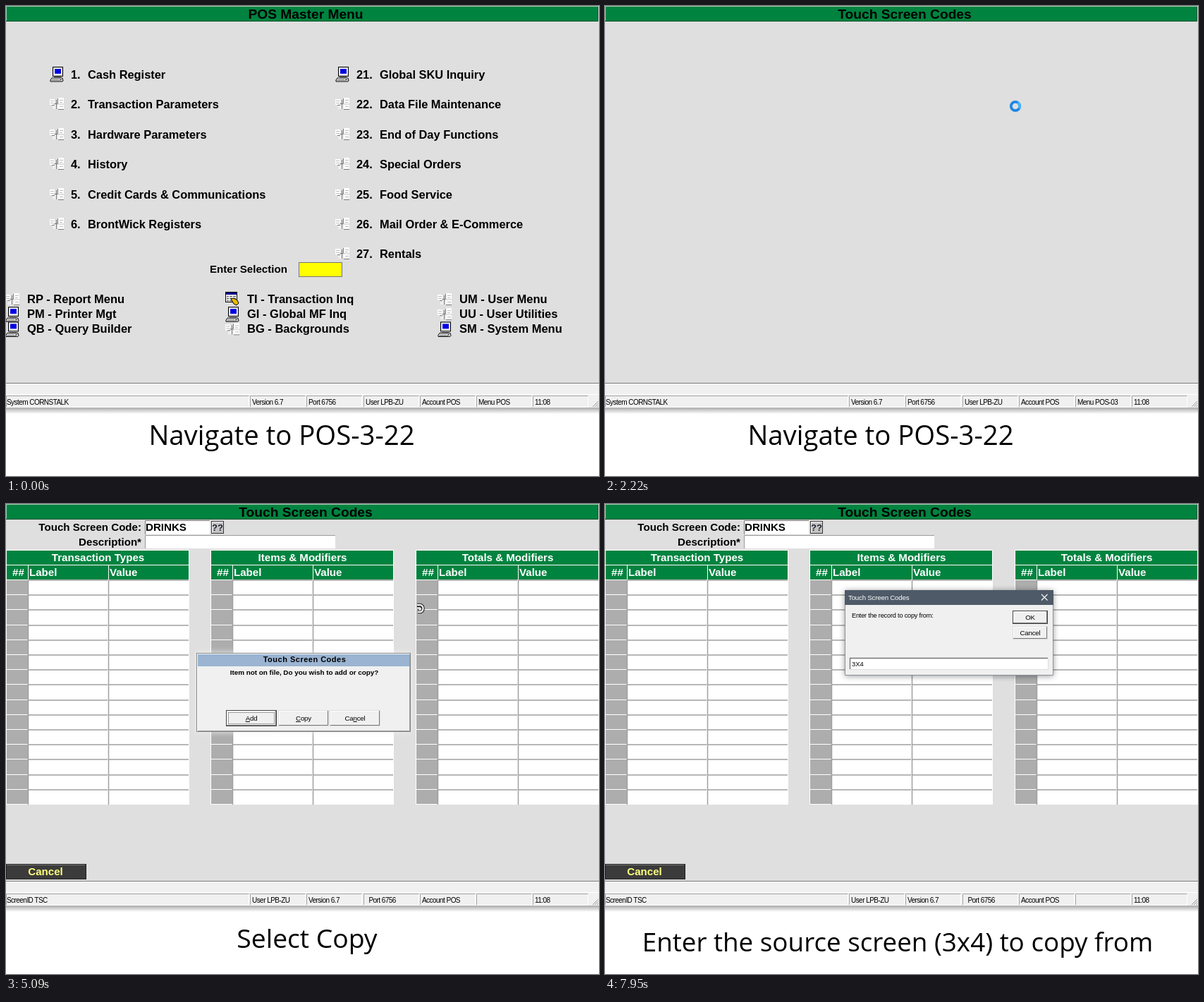
Recreate the animation shown at these times as an HTML page. Size 841 by 666 pixels, loop 8000 ms.

```html
<!DOCTYPE html>
<html lang="en">
<head>
<meta charset="utf-8">
<title>Touch screen codes</title>
<style>
html, body { margin: 0; width: 100%; height: 100%; overflow: hidden; background: #fff; }
svg { display: block; width: 841px; height: 666px; }
text { font-family: "Liberation Sans", Arial, sans-serif; white-space: pre; }
.b { font-weight: bold; }
.cap { font-family: "Open Sans", "Noto Sans", sans-serif; }
.s { letter-spacing: -.55px; }
.t { letter-spacing: -.2px; }
.wide { font-weight: bold; letter-spacing: .5px; }
.u { text-decoration: underline; }
</style>
</head>
<body>
<svg id="stage" viewBox="0 0 841 666"></svg>
<script>
const GREEN = '#00833f', FACE = '#f0f0f0';

const rect = (x, y, w, h, fill, more = '') =>
  `<rect x="${x}" y="${y}" width="${w}" height="${h}" fill="${fill}" ${more}/>`;
const text = (x, y, size, s, cls = 'b', fill = '#000', anchor = 'start') =>
  `<text x="${x}" y="${y}" font-size="${size}" class="${cls}" fill="${fill}" text-anchor="${anchor}">${s}</text>`;
const mid = (x, y, size, s, cls, fill) => text(x, y, size, s, cls, fill, 'middle');
const line = (d, color, w = 1) => `<path d="${d}" fill="none" stroke="${color}" stroke-width="${w}"/>`;
const group = (id, ...parts) => `<g id="${id}">${parts.join('')}</g>`;
const at = (x, y, s) => `<g transform="translate(${x} ${y})">${s}</g>`;

// Menu icons, 20 pixels wide
const PC = rect(4.5, .5, 14, 13, '#d8d8d8', 'stroke="#000"') + rect(6, 2, 11, 9, '#fff') +
  rect(7, 3, 9, 7, '#0000e0') + rect(6, 14, 10, 2, '#888') +
  '<path d="M3 16h15l1 4-1 1H1v-2z" fill="#eee" stroke="#000"/>' +
  line('M3 18.5h10M2 20h13', '#777') + line('M14 18.5h3', '#000');
const PAGES = rect(0, 4, 7, 8, '#fff') + rect(12, 2, 8, 8, '#fff') + rect(12, 12, 8, 7, '#fff') +
  rect(4, 12, 7, 6, '#eee') + line('M1 6.5h5M1 9.5h5M14 5.5h5M14 8.5h4M14 14.5h5', '#bbb') +
  line('M6.5 10.5h5M9.5 5v13M11.5 3v7M12 18.5h8M3 12.5h4', '#777');
const TABLE = rect(.5, .5, 16, 14, '#fff', 'stroke="#000"') + rect(1, 1, 15, 3, '#000090') +
  line('M2 6.5h13M2 9.5h13M2 12.5h9', '#666', 1.4) + line('M5.5 4v10M10.5 4v10', '#fff') +
  '<path d="M8 10l4-1 5 3 2 4-3 3-4-2z" fill="#e8b800" stroke="#000"/>';

const title = s => mid(425, 18, 19.2, s);

function menu(x, gap, first, items, icons) {
  return items.map((s, i) => {
    const y = Math.round(97 + 42.4 * i);
    return at(x, y - 11, icons(i) ? PC : PAGES) +
      text(x + 30, y + 5.5, 16.4, first + i + '.') + text(x + gap, y + 5.5, 16.4, s);
  }).join('');
}

const foot = [
  [-1, 30, [['RP - Report Menu', PAGES], ['PM - Printer Mgt', PC], ['QB - Query Builder', PC]]],
  [311, 342, [['TI - Transaction Inq', TABLE], ['GI - Global MF Inq', PC], ['BG - Backgrounds', PAGES]]],
  [612, 643, [['UM - User Menu', PAGES], ['UU - User Utilities', PAGES], ['SM - System Menu', PC]]]
].map(([ix, x, rows]) => rows.map(([s, icon], i) =>
  at(ix, 405 + 21.2 * i, icon) + text(x, 421 + 21.2 * i, 16.5, s)).join('')).join('');

const button = (w, y, x, s) => rect(.5, y + .5, w - 1, 21, '#3b3b3b', 'stroke="#222"') +
  line(`M1 ${y + 1.5}H${w - 2}`, '#777') + mid(x, y + 16, 15.1, s, 'b', '#ffff80');

const panels = [0, 346, 426, 507, 587, 667, 747];
const status = (id, list) => group(id, ...list.map((s, i) => text(panels[i] + (i ? 3 : 1), 564.5, 10, s, 's')));
const statusBar = panels.map((x, i) => {
  const r = i ? x + 78.5 : 344.5;
  return line(`M${x + .5} 568V552.5H${r}`, '#a5a5a5') + line(`M${x} 568.5H${r}V553`, '#fff');
}).join('') + line('M832 568l8-8M835 568l5-5M838 568l2-2', '#999');

function grid(x, name) {
  let s = rect(x, 65, 260, 361, '#fff') + rect(x + 1, 66, 258, 20, GREEN) + rect(x + 1, 87, 258, 20, GREEN) +
    rect(x + 31, 87, 1, 20, '#fff') + rect(x + 145, 87, 1, 20, '#fff') +
    mid(x + 130.5, 80.5, 15.1, name, 'b', '#fff') + text(x + 9, 102, 15.1, '##', 'b', '#fff') +
    text(x + 33, 102, 15.1, 'Label', 'b', '#fff') + text(x + 147, 102, 15.1, 'Value', 'b', '#fff');
  for (let i = 0; i < 15; i++) {
    const y = Math.round(108 + 21.2 * i), h = Math.round(129.2 + 21.2 * i) - y;
    s += rect(x + 1, y, 30, h - 1, '#adadad') +
      line(`M${x + 31.5} ${y + h}V${y}H${x + 144}M${x + 145.5} ${y + h}V${y}H${x + 259}`, '#a0a0a0', 1.5);
  }
  return s;
}

const page = grid(0, 'Transaction Types') + grid(290, 'Items &amp; Modifiers') + grid(581, 'Totals &amp; Modifiers') +
  text(192, 38, 15.1, 'Touch Screen Code:', 'b', '#000', 'end') +
  text(192, 59, 15.1, 'Description*', 'b', '#000', 'end') +
  rect(197, 44, 270, 19, '#fff') + line('M197.5 63V44.5H467', '#999') +
  rect(291.5, 24.5, 17, 17, '#c4c4c4', 'stroke="#333"') + line('M292.5 41V25.5H308', '#fff') +
  mid(300, 38, 13, '??', 'b', '#223') + button(114, 510, 56, 'Cancel');

// Raised dialog button
const push = (x, y, w, h, label, strong) => rect(x + .5, y + .5, w - 1, h - 1, FACE, `stroke="${strong ? '#444' : '#ddd'}"`) +
  line(`M${x + 1.5} ${y + h - 2}V${y + 1.5}H${x + w - 2}`, '#fff') +
  line(`M${x + 1} ${y + h - 1.5}H${x + w - 1.5}V${y + 1}`, '#777') +
  mid(x + w / 2, y + h / 2 + 3.5, 9.7, label, 't');
const under = s => `<tspan class="u">${s}</tspan>`;

const ask = rect(270, 211, 304, 112, FACE, 'filter="url(#soft)"') +
  rect(270.5, 211.5, 303, 111, FACE, 'stroke="#858585"') + line('M271.5 322V212.5H572', '#fff') +
  line('M572.5 213V321.5H272', '#a0a0a0') + rect(272, 213, 300, 17, '#9ab4d2') +
  mid(423.5, 223.5, 11, 'Touch Screen Codes', 'wide') +
  mid(423, 242, 9.9, 'Item not on file, Do you wish to add or copy?') +
  push(312, 292, 72, 23, under('A') + 'dd', true) +
  rect(315.5, 295.5, 65, 16, 'none', 'stroke="#555" stroke-dasharray="1 1"') +
  push(386, 292, 72, 23, under('C') + 'opy') + push(459, 292, 72, 23, 'Ca' + under('n') + 'cel');

const prompt = rect(340, 123, 296, 121, '#000', 'opacity=".4" filter="url(#soft)"') +
  rect(340, 122, 296, 121, FACE) + rect(340, 122, 296, 21, '#4e5a68') +
  line('M340.5 143V242.5H635.5V143', '#8a929b') +
  text(345, 136, 9.7, 'Touch Screen Codes', 't', '#fff') +
  line('M619 128l8.5 8.5M627.5 128l-8.5 8.5', '#fff', 1.1) +
  text(350, 160.5, 9.2, 'Enter the record to copy from:', 't') +
  push(578, 151, 50, 19, 'OK', true) + push(578, 173, 50, 19, 'Cancel') +
  rect(347, 218, 281, 16, '#fff') + line('M347.5 234V218.5H628', '#777', 1.4) +
  line('M348 234.5H628.5V219', '#ddd') +
  '<text id="record" x="350" y="229.5" font-size="9.4"></text>' +
  group('caret2', rect(0, 221, 1, 11, '#000'));

const caption = (id, x, y, size, s) => group(id, mid(x, y, size, s, 'cap'));

const stage = document.getElementById('stage');
stage.innerHTML =
  `<defs><linearGradient id="fade" x2="0" y2="1"><stop stop-color="#aaa"/><stop offset="1" stop-color="#fff"/></linearGradient>
  <filter id="soft" x="-10%" y="-20%" width="120%" height="140%"><feGaussianBlur stdDeviation="4"/></filter></defs>` +
  rect(0, 0, 841, 666, '#fff') + rect(0, 0, 841, 570, '#dfdfdf') +
  rect(0, 0, 840, 22, GREEN) + line('M.5 21V.5H840', '#a5cdb6') + line('M0 21.5H839.5V1', '#00502a') +
  rect(0, 534, 841, 36, FACE) + line('M0 534.5H841', '#777') + line('M0 535.5H841M0 550.5H841', '#fff') +
  statusBar + rect(0, 569, 841, 9, 'url(#fade)') +
  group('master', title('POS Master Menu'),
    menu(62, 54, 1, ['Cash Register', 'Transaction Parameters', 'Hardware Parameters', 'History',
      'Credit Cards &amp; Communications', 'BrontWick Registers'], i => i < 1),
    menu(467, 63, 21, ['Global SKU Inquiry', 'Data File Maintenance', 'End of Day Functions', 'Special Orders',
      'Food Service', 'Mail Order &amp; E-Commerce', 'Rentals'], i => i < 1)) +
  group('hardware', title('Hardware Parameters Menu'), button(73, 22, 36, '&lt;-Back'),
    menu(31, 54, 1, ['Register Parameters', 'Hardware Configuration Codes', 'Receipt Header', 'Receipt Trailer',
      'Gift Receipts'], () => true),
    menu(457, 63, 21, ['Function Key Definitions', 'Touch Screen Codes'], () => true)) +
  group('foot', foot) + group('enter', text(289, 378, 15.1, 'Enter Selection')) +
  group('choice', rect(415.5, 363.5, 61, 20, '#ff0', 'stroke="#777"')) +
  group('codes', title('Touch Screen Codes')) +
  group('page', page, rect(197, 23, 92, 20, '#fff', 'id="field"'), line('M197.5 43V23.5H289', '#777'),
    '<text id="code" x="198" y="38" font-size="15.1" class="b"></text>',
    group('caret1', rect(0, 23, 1.5, 16, '#000'))) +
  status('stMaster', ['System CORNSTALK', 'Version 6.7', 'Port 6756', 'User LPB-ZU']) +
  status('stAccount', ['', '', '', '', 'Account POS', '', '11:08']) +
  status('stMenu', ['', '', '', '', '', 'Menu POS']) +
  status('stMenu3', ['', '', '', '', '', 'Menu POS-03']) +
  status('stCodes', ['ScreenID TSC', 'User LPB-ZU', 'Version 6.7', '&#160; Port 6756']) +
  caption('cap1', 391, 622, 38.3, 'Navigate to POS-3-22') +
  caption('cap2', 459.5, 622, 37, 'Enter the new (DRINKS) menu') +
  caption('cap3', 427, 629, 37.3, 'Select Copy') +
  caption('cap4', 415, 634, 36.8, 'Enter the source screen (3x4) to copy from') +
  group('ask', ask) + group('prompt', prompt) +
  group('arrow', '<path d="M.5 .5V16l3.5-3.3 2.5 5.800 2.3-1-2.5-5.700H11z" fill="#fff" stroke="#000"/>') +
  group('curl', ...[['#222', 4.6], ['#eee', 2.4]].map(([c, w]) =>
    line('M3 3H7A4.5 5 0 0 1 7 13H4M3 7.5H7Q9 9 6 10', c, w))) +
  group('ring', '<circle r="6.2" fill="none" stroke="#1c86e6" stroke-width="3.8"/>',
    '<path id="spin" d="M-6.2 0A6.2 6.2 0 0 1 0 -6.2" fill="none" stroke="#45b4fa" stroke-width="3.8"/>');

const el = id => document.getElementById(id);
const show = (id, on) => el(id).style.display = on ? '' : 'none';
const move = (id, x, y) => el(id).setAttribute('transform', `translate(${x} ${y})`);
// Progress from a to b in n equal jumps, the first at a and the last at b
const steps = (t, a, b, n) => Math.max(0, Math.min(n, Math.floor((t - a) / (b - a) * (n - 1) + .15) + 1)) / n;
const ease = k => k ** 3 * (k * (6 * k - 15) + 10);
const mix = (a, b, k) => a + (b - a) * k;
const typed = (s, times, t) => s.slice(0, times.filter(x => t >= x).length);

function type(id, caretId, s, x, caretOn) {
  const node = el(id);
  if (node.textContent !== s) node.textContent = s;
  show(caretId, caretOn);
  move(caretId, x + (s ? node.getComputedTextLength() : 0), 0);
}

function pointer(t) {
  if (t < 1220) {
    const k = ease(steps(t, 210, 990, 11));
    return [mix(330, 185, k), mix(570, 181, k)];
  }
  if (t < 2370) {
    const k = ease(steps(t, 1680, 1910, 4));
    return [mix(185, 582, k), mix(181, 142, k)];
  }
  const k = ease(steps(t, 5090, 5860, 11));
  return [mix(581, 430, k), mix(139, 303, k)];
}

function draw(t) {
  show('master', t < 1220);
  show('hardware', t >= 1220 && t < 2220);
  show('foot', t < 2220);
  show('enter', t < 1220 || t >= 1680 && t < 2220);
  show('choice', t < 1060);
  show('codes', t >= 2220);
  show('page', t >= 2370);
  show('stMaster', t < 1140 || t >= 1220 && t < 2370);
  show('stMenu', t < 1220);
  show('stMenu3', t >= 1220 && t < 2370);
  show('stCodes', t >= 2370);
  show('cap1', t < 2370);
  show('cap2', t >= 2370 && t < 4540);
  show('cap3', t >= 4540 && t < 5940);
  show('cap4', t >= 5940);
  show('ask', t >= 4540 && t < 5860);

  el('field').setAttribute('fill', t < 4460 ? '#ff0' : '#fff');
  type('code', 'caret1', typed('DRINKS', [3290, 3450, 3690, 3770, 3840, 4390], t), 197.5,
    t < 2910 || t >= 3290 && t < 4460);

  const k = steps(t, 5940, 6170, 4), alpha = 1 - (1 - k) ** 3, size = 1 - (1 - alpha) * .05;
  show('prompt', k > 0);
  el('prompt').setAttribute('opacity', alpha);
  el('prompt').setAttribute('transform', `translate(488 182) scale(${size}) translate(-488 -182)`);
  type('record', 'caret2', typed('3X4', [6710, 7010, 7470], t), 350, t < 6400 || t >= 6710 && t < 7950);

  // The pointer hides while typing and is a plain arrow over the dialog
  const [x, y] = pointer(t);
  const busy = t >= 1060 && t < 1220 || t >= 2140 && t < 2370 || t >= 5860 && t < 6710;
  const seen = t >= 210 && t < 3290 || t >= 5090 && t < 5860;
  const curl = t >= 2370 && y < 211;
  show('ring', busy);
  show('curl', seen && !busy && curl);
  show('arrow', seen && !busy && !curl);
  for (const id of ['ring', 'arrow', 'curl']) move(id, x, y);
  el('spin').setAttribute('transform', `rotate(${Math.floor(t / 77) * 30})`);
}

function tick() {
  draw(performance.now() % 8000);
  requestAnimationFrame(tick);
}
tick();
</script>
</body>
</html>
```
